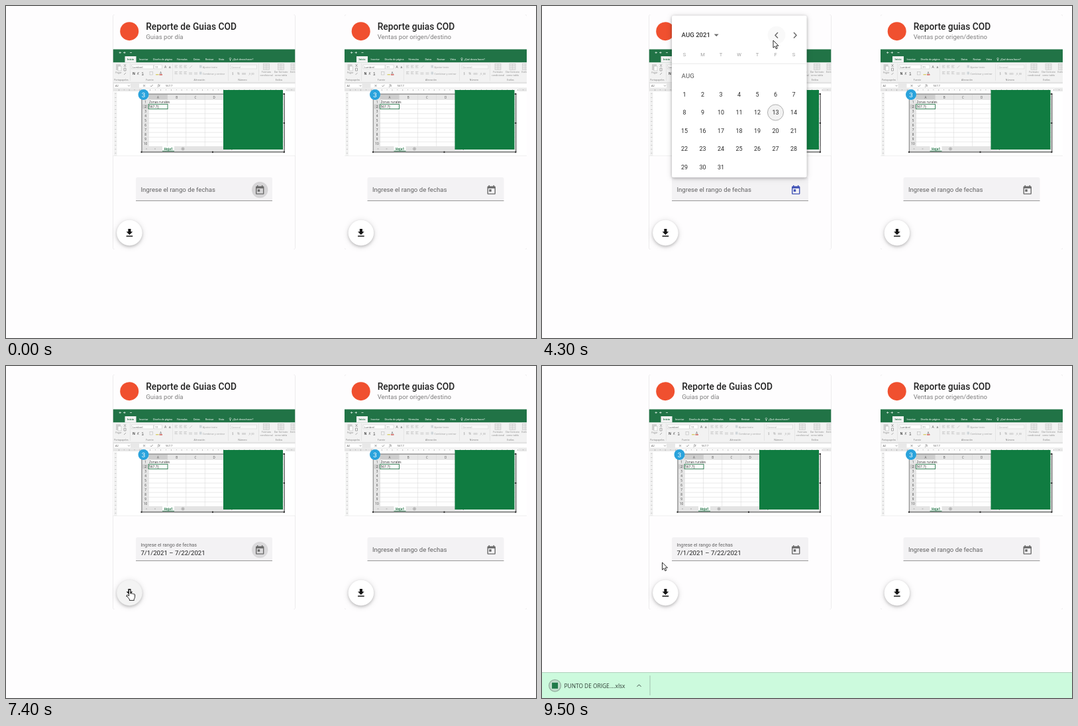
These frames come from a looping animation (800x502 px, 9.6 s). An HTML page:

```html
<!DOCTYPE html>
<html lang="es">
<head>
<meta charset="utf-8">
<title>Reporte de guias</title>
<style>
html, body { margin: 0; width: 100%; height: 100%; overflow: hidden; background: #fefdfe; }
svg { display: block; position: absolute; left: 0; top: 0; font-family: Roboto, Arial, sans-serif; }
.ui { font-family: "Open Sans", "Noto Sans", sans-serif; }
.card { filter: drop-shadow(0 .9px .5px rgba(0,0,0,.24)) drop-shadow(0 .4px .5px rgba(0,0,0,.06)); }
.fab { filter: drop-shadow(0 2px 2px rgba(0,0,0,.18)) drop-shadow(0 1px 4px rgba(0,0,0,.14)); }
.panel { filter: drop-shadow(0 1.5px 2px rgba(0,0,0,.26)) drop-shadow(0 1px 4px rgba(0,0,0,.14)); }
.mid { text-anchor: middle; }
</style>
</head>
<body>
<svg id="stage" width="800" height="502" viewBox="0 0 800 502"></svg>
<script>
const LOOP = 9600, STEP = 100, UNIT = 0.689, PITCH = 27.5, COL0 = 215, ROW0 = 133.5;
const INDIGO = '#3f51b5';
const TODAY_ICON = 'M19 3h-1V1h-2v2H8V1H6v2H5c-1.1 0-2 .9-2 2v14c0 1.1.9 2 2 2h14c1.1 0 2-.9 2-2V5c0-1.1-.9-2-2-2zm0 16H5V8h14v11zM7 10h5v5H7z';
const SAVE_ICON = 'M19 9h-4V3H9v6H5l7 7 7-7zM5 18v2h14v-2H5z';

const rect = (x, y, w, h, fill, more = '') => `<rect x="${x}" y="${y}" width="${w}" height="${h}" fill="${fill}" ${more}/>`;
const text = (x, y, size, str, fill = '#555', more = '') => `<text x="${x}" y="${y}" font-size="${size}" fill="${fill}" ${more}>${str}</text>`;
const circle = (x, y, r, fill, more = '') => `<circle cx="${x}" cy="${y}" r="${r}" fill="${fill}" ${more}/>`;
const line = (d, color, w = 0.6, more = '') => `<path d="${d}" fill="none" stroke="${color}" stroke-width="${w}" ${more}/>`;
const icon = (x, y, d, fill, more = '') => `<path d="${d}" fill="${fill}" transform="translate(${x} ${y}) scale(${UNIT}) translate(-12 -12)" ${more}/>`;
const times = (n, f) => Array.from({ length: n }, (_, i) => f(i)).join('');

// Spreadsheet picture shared by both cards
function ribbon() {
  const tabs = [[201, 'Insertar'], [222, 'Diseño de página'], [258, 'Fórmulas'], [283, 'Datos'], [301, 'Revisar'], [321, 'Vista'], [342, '¿Qué desea hacer?']];
  const groups = [[174, 'Portapapeles'], [217, 'Fuente'], [292, 'Alineación'], [357, 'Número'], [412, 'Estilos']];
  const labels = [[170, 102, 'Pegar'], [393, 101, 'Formato'], [393, 105.5, 'condicional'], [415, 101, 'Dar formato'], [415, 105.5, 'como tabla'], [434, 101, 'Estilos']];
  let s = rect(161.5, 65.5, 275, 20, '#217346');
  s += line('M174 70.5h-3l1.5-1.5m-1.5 1.5l1.5 1.5M177 70.5h3l-1.5-1.5m1.5 1.5l-1.5 1.5M187 70.5h3', '#dcebe2', 0.8);
  s += rect(179.5, 76, 17, 9.5, '#f3f3f3') + text(183, 82, 3.7, 'Inicio', '#217346', 'font-weight="700"');
  s += tabs.map(([x, n]) => text(x, 82, 3.5, n, '#eef6f1', 'font-weight="600"')).join('');
  s += circle(338.5, 79.7, 1.3, 'none', 'stroke="#fff" stroke-width=".5"') + rect(338, 81, 1, 1.7, '#fff');
  s += rect(161.5, 85.5, 275, 30.5, '#f2f2f2') + rect(161.5, 115.5, 275, 0.7, '#d0d0d0');
  s += [187, 251, 335, 381].map(x => rect(x, 87, 0.5, 26, '#d8d8d8')).join('');
  s += groups.map(([x, n]) => text(x, 112.5, 3.5, n, '#777', 'class="mid"')).join('');
  s += labels.map(([x, y, n]) => text(x, y, 3.6, n, '#888', 'class="mid"')).join('');
  s += rect(166, 88, 7, 9, '#d0d0d0') + rect(169, 91, 5, 7, '#fafafa', 'stroke="#b5b5b5" stroke-width=".5"');
  s += line('M178 88l3 4m0-4l-3 4M178 94h3v4h-3zM178 104l3-3', '#999', 0.8);
  s += rect(189.5, 89, 33, 6, '#fff', 'stroke="#c6c6c6" stroke-width=".5"') + text(191, 93.5, 4, 'Lumbrel');
  s += rect(223.5, 89, 12, 6, '#fff', 'stroke="#c6c6c6" stroke-width=".5"') + text(225, 93.5, 4, '11');
  s += text(239, 94, 5, 'A') + text(246, 94, 4.2, 'A');
  s += text(191, 103.5, 4.8, 'N', '#444', 'font-weight="700"') + text(198, 103.5, 4.8, 'K', '#444', 'font-style="italic"') + text(205, 103.5, 4.8, 'S', '#444', 'text-decoration="underline"');
  s += rect(217, 99.5, 4.5, 4.5, 'none', 'stroke="#bbb" stroke-width=".6"') + rect(226, 103, 4.5, 1.4, '#d8cf6a');
  s += text(232, 103, 4.8, 'A') + rect(231.5, 103.3, 4.5, 1.2, '#cc3b32');
  s += times(6, i => {
    const x = 254.5 + i % 3 * 7, y = i < 3 ? 90 : 99.5;
    return line(`M${x} ${y}h4.5m-4.5 1.6h3.2m-3.2 1.6h4.5`, '#b4b4b4');
  });
  s += line('M277 94l4-4M276 101h5m-5 2h5M284 101h5m-5 2h5', '#b4b4b4') + rect(292, 89.5, 3.5, 4, '#d0d6da') + rect(292, 99.5, 3.5, 4, '#d0d6da');
  s += text(297, 93.5, 3.7, 'Ajustar texto', '#999') + text(297, 103.5, 3.7, 'Combinar y centrar', '#999');
  s += rect(338.5, 89, 40, 6, '#f7f7f7', 'stroke="#cfcfcf" stroke-width=".5"') + text(340, 93.5, 3.8, 'General', '#aaa');
  s += text(341, 103.5, 4.4, '$', '#999') + text(349, 103.5, 4.4, '%', '#999') + text(356, 103.5, 3.6, '000', '#999') + text(366, 103.5, 3.4, ',0 ,00', '#999');
  s += [388.5, 410.5, 430].map(x => rect(x, 87.5, 9, 9, '#e8e8e8', 'stroke="#bbb" stroke-width=".5"') + line(`M${x} 90.5h9m-9 3h9M${x + 4.5} 87.5v9`, '#c4c4c4', 0.5)).join('');
  s += rect(161.5, 116, 275, 8.5, '#e8e8e8') + rect(163, 117.5, 25, 6, '#fff') + rect(201, 117.5, 236, 6, '#fff');
  s += text(165, 122.3, 4.1, 'A2') + text(241, 122.3, 4.1, '567.7');
  s += line('M184 119.8l1.5 1.5 1.5-1.5M207 119l3 3m0-3l-3 3M218 120.5l1.2 1.5 2.5-3', '#666') + text(229, 122.3, 4.5, 'fx', '#555', 'font-style="italic"');
  return s;
}

function sheet() {
  let s = rect(161.5, 124.5, 275, 102, '#fff') + rect(161.5, 124.5, 275, 4.5, '#e6e6e6') + rect(205, 125, 219, 4, '#f9f9f9');
  s += times(34, i => rect(170 + i * 7.9, 126, 0.6, i % 2 ? 1.4 : 2.2, '#999'));
  s += rect(163, 130, 4.5, 96.5, '#f1f1f1') + times(16, i => rect(164.3, 132 + i * 6, 2, 0.6, '#aaa'));
  s += rect(205, 133.2, 215, 87.3, '#fff', 'stroke="#989898" stroke-width="1.6"');
  s += rect(206, 134, 213.5, 7.5, '#e6e6e6') + rect(206, 141.5, 9, 70.5, '#e6e6e6');
  s += rect(215, 134, 29, 7.5, '#cecece') + rect(206, 148.5, 9, 7, '#cecece');
  s += times(8, i => rect(215 + i * 28.3, 134, 0.5, 78, '#d4d4d4')) + times(11, i => rect(206, 141.5 + i * 7.05, 213.5, 0.5, '#d4d4d4'));
  s += times(7, i => text(229.5 + i * 28.2, 139.7, 4.5, 'ABCDEFG'[i], '#555', 'class="mid"'));
  s += times(10, i => text(210.5, 146.9 + i * 7.05, 4.7, i + 1, '#444', 'class="mid"'));
  s += text(216, 146.9, 4.9, 'Zonas rurales', '#222') + rect(215.2, 148.6, 28.8, 7.1, '#fff', 'stroke="#217346" stroke-width=".9"') + text(216, 154, 4.9, '567.7', '#222') + rect(229.3, 150, 0.5, 5, '#222');
  s += rect(206, 212.2, 213.5, 7.8, '#e4e4e4') + rect(236, 212.2, 18, 7, '#fff') + rect(236, 218.8, 18, 0.9, '#217346');
  s += text(245, 217.6, 4.6, 'Hoja1', '#217346', 'class="mid" font-weight="700"');
  s += circle(267, 216, 2, 'none', 'stroke="#888" stroke-width=".6"') + line('M266 216h2m-1-1v2M211 216h2M224 216h2', '#888');
  s += rect(338, 213.5, 80, 5, '#f6f6f6') + text(339.5, 217.5, 3.8, '◂', '#777');
  s += line('M204 221H420.3V133', '#555', 0.7);
  s += [[203.5, 219.8], [311, 219.8], [418.8, 219.8], [418.8, 176], [418.8, 132]].map(([x, y]) => rect(x, y, 2, 2, '#222')).join('');
  return s + rect(328, 127, 90, 90, '#107c41');
}

const picture = `<g class="ui" clip-path="url(#pictureClip)">${ribbon()}${sheet()}</g>` + circle(207.5, 134, 8, '#2aa3dc') + text(207.5, 137.5, 9.8, '3', '#fff', 'class="mid"') + rect(161.5, 226.3, 275, 0.6, '#e8e8e8');

function card(dx, id, title, sub) {
  return `<g transform="translate(${dx})">` +
    rect(161.5, 13, 275, 355, '#fefdfe', 'rx="2.7" class="card"') +
    circle(186.2, 38.2, 14, '#f0502f') +
    text(211.2, 35.8, 13.78, title, 'rgba(0,0,0,.87)', 'font-weight="500"') +
    text(211.2, 50.2, 9.65, sub, 'rgba(0,0,0,.5)') + picture +
    rect(196, 259, 206, 36, '#f3f2f4', 'rx="2.5"') +
    rect(196, 294, 206, 0.9, '#8d8d8d', `id="${id}Line"`) +
    text(203.4, 280.8, 9.65, 'Ingrese el rango de fechas', 'rgba(0,0,0,.6)', `id="${id}Label"`) +
    text(203.4, 285.6, 9.65, '', 'rgba(0,0,0,.87)', `id="${id}Value"`) +
    circle(383.2, 278, 12.2, '#000', `id="${id}Halo" opacity="0"`) +
    icon(383.2, 278.6, TODAY_ICON, '#696969', `id="${id}Icon"`) +
    circle(186.4, 343, 19.2, '#fff', `class="fab" id="${id}Fab"`) +
    icon(186.4, 343.2, SAVE_ICON, '#161616') + '</g>';
}

const ARROW = 'M0 0V11.2L2.6 8.8 4.4 12.8 6.2 12 4.5 8.1H8z';
const HAND = 'M-1.2 .8Q0-.7 1.2 .8V6.2Q2.4 5 3.5 6.4 4.8 5.6 5.7 6.9 7.4 6.2 7.8 8V11.5Q7.6 13.3 6.5 14.4V16.4H-.4V14.8Q-2.6 12.2-4.4 9.6-4.6 7.6-2.9 8.1L-1.2 9.8Z';

const stage = document.getElementById('stage');
stage.innerHTML = '<clipPath id="pictureClip"><rect x="161.5" y="65" width="275" height="162"/></clipPath>' +
  '<clipPath id="nameClip"><rect id="nameBox" x="32" y="464" width="0" height="38"/></clipPath>' +
  card(0, 'a', 'Reporte de Guias COD', 'Guias por día') +
  card(349.5, 'b', 'Reporte guias COD', 'Ventas por origen/destino') +
  '<g id="panel"></g>' +
  '<g id="drop">' + `<path d="M-2.5-6.5h5v6H6L0 6-6-.5h3.5z" fill="#9bd3ee" stroke="#2795d0" stroke-width="1.2"/>` + line('M-2-3.5h4M-2-.5h4M-2 2.3h4', '#2580bd', 0.9) + '</g>' +
  line('M14.5 453H36', '#25a6b8', 2, 'stroke-dasharray="1.6 .6" id="dropLine"') +
  '<g id="shelf">' + rect(0, 463, 800, 39, '#ccfadd') + rect(0, 463, 800, 0.8, '#a8c6b4') +
  circle(19.5, 483.3, 9, '#bfdccb', 'id="ring" stroke="#222" stroke-width="1.2"') + rect(15, 478.8, 9, 9, '#21794a') +
  text(33.6, 486.7, 8.35, 'PUNTO DE ORIGE....xlsx', '#2c3a32', 'class="ui" clip-path="url(#nameClip)"') +
  '<g id="tail">' + line('M-19 1.8l3-3 3 3', '#3b4a41', 1) + line('M.5-15V15', '#9ebcab', 0.9) + '</g></g>' +
  '<path id="cursor" fill="#fff" stroke="#111" stroke-width=".9" stroke-linejoin="round"/>';

const el = id => document.getElementById(id);
const set = (id, attrs) => { for (const k in attrs) el(id).setAttribute(k, attrs[k]); };
const show = (id, on) => set(id, { visibility: on ? 'visible' : 'hidden' });

// Linear interpolation through [time, ...values] rows
function track(rows, t) {
  let i = 0;
  while (i < rows.length - 2 && t >= rows[i + 1][0]) i++;
  const a = rows[i], b = rows[i + 1];
  const k = Math.min(1, Math.max(0, (t - a[0]) / (b[0] - a[0])));
  return a.slice(1).map((v, j) => v + (b[j + 1] - v) * k);
}

const PATH = [
  [1400, 418, 264], [1600, 388.5, 274], [2300, 388.5, 274], [2500, 361, 234], [2900, 361, 230], [3500, 358, 170],
  [4100, 352, 82], [4300, 349, 52], [4500, 352, 44], [4900, 352, 44], [5400, 325, 106],
  [5600, 325, 106], [6000, 324.5, 188], [6300, 324.5, 188], [6600, 300, 220], [7200, 192, 316],
  [7300, 187, 338], [7700, 186, 338], [8000, 183, 307], [8600, 181, 299], [9200, 181.5, 297]
];
const PANEL_FADE = [[2000, 0], [2200, 0.65], [2300, 1], [6200, 1], [6300, 0.17], [6400, 0]];
const SEPARATOR = [[7800, 24], [8000, 50], [8400, 162.5]];

function cellAt(x, y, july) {
  const col = Math.round((x - COL0) / PITCH), row = Math.round((y - ROW0) / PITCH);
  const day = july ? row * 7 + col + 4 : row * 7 + col + 1;
  return col >= 0 && col < 7 && row >= (july ? -1 : 0) && day > 0 && day < 32 ? day : 0;
}

function cellPos(day, july) {
  const n = july ? day + 3 : day - 1;
  return [COL0 + n % 7 * PITCH, ROW0 + (Math.floor(n / 7) - (july ? 1 : 0)) * PITCH];
}

// One bar per week between two days
function span(from, to, style) {
  let s = '';
  for (let d = from; d <= to;) {
    const [x, y] = cellPos(d, true);
    const end = Math.min(to, d + 6 - (d + 3) % 7);
    s += rect(x - 12, y - 12, (end - d) * PITCH + 24, 24, ...style);
    d = end + 1;
  }
  return s;
}

function drawPanel(t, day, july) {
  const start = t >= 5600, end = t >= 6300;
  let s = rect(196, 14.5, 203.6, 244.7, '#fff', 'rx="2.7" class="panel"');
  if (t >= 4300 && t < 5100) s += circle(354, 44, 13.5, `rgba(0,0,0,${t < 4400 ? 0.025 : 0.05})`);
  s += text(210.6, 47.2, 9.65, july ? 'JUL 2021' : 'AUG 2021', 'rgba(0,0,0,.8)', 'font-weight="500"');
  s += `<path d="M${july ? 255 : 259.7} 42.4h7l-3.5 3.5z" fill="#6c6c6c"/>`;
  s += line('M356 40l-4 4.2 4 4.2M380 40l4 4.2-4 4.2', '#666', 1.4);
  s += times(7, i => text(COL0 + i * PITCH, 76, 7.5, 'SMTWTFS'[i], 'rgba(0,0,0,.38)', 'class="mid"'));
  s += rect(196, 86.8, 203.6, 0.7, '#dedede');
  s += text(210.6, 109, 9.65, july ? 'JUL' : 'AUG', 'rgba(0,0,0,.54)', 'font-weight="500"');
  if (end) s += span(1, 22, ['rgba(63,81,181,.2)', 'rx="12"']);
  else if (start && day > 1) s += span(1, day, ['none', 'rx="12" stroke="#ccc" stroke-width=".7" stroke-dasharray="2 2"']);
  for (let d = 1; d < 32; d++) {
    const [cx, cy] = cellPos(d, july);
    const picked = july && (start && d === 1 || end && d === 22);
    if (picked) s += circle(cx, cy, 12, INDIGO);
    else if (d === day) s += circle(cx, cy, 12, july ? 'rgba(63,81,181,.3)' : 'rgba(0,0,0,.05)');
    if (!july && d === 13) s += circle(cx, cy, 12, '#f2f2f2', 'stroke="#9c9c9c" stroke-width=".8"');
    s += text(cx, cy + 3.2, 8.96, d, picked ? '#fff' : 'rgba(0,0,0,.84)', 'class="mid"');
  }
  el('panel').innerHTML = s;
}

function drawField(t) {
  const open = t >= 2200 && t < 6300, hover = t >= 1500 && t < 2200, filled = t >= 5600;
  set('aLine', { y: hover ? 293.4 : 294, height: hover ? 1.5 : 0.9, fill: hover ? '#222' : '#8d8d8d' });
  set('aLabel', { y: filled ? 273 : 280.8, 'font-size': filled ? 7.24 : 9.65 });
  el('aValue').textContent = t >= 6300 ? '7/1/2021 – 7/22/2021' : filled ? '7/1/2021 –' : '';
  const halo = t < 2400 ? 0.12 : t < 2700 ? 0.04 : t >= 6300 && t < 7500 ? 0.1 : 0;
  set('aHalo', { opacity: halo });
  set('aIcon', { fill: open ? INDIGO : '#696969' });
  set('aFab', { fill: t < 7300 || t >= 8600 ? '#fff' : t < 7500 ? '#f3f3f3' : '#e5e5e5' });
}

function drawShelf(t) {
  show('shelf', t >= 7700);
  set('shelf', { transform: `translate(0 ${t < 7800 ? 20 : 0})` });
  const [sep] = track(SEPARATOR, t);
  set('tail', { transform: `translate(${sep} 483)` });
  set('nameBox', { width: Math.max(0, sep - 50) });
  const pulse = t < 8400 ? 1 : 0.55 + 0.25 * Math.cos((t - 8400) / 1100 * Math.PI * 3);
  set('ring', { 'stroke-opacity': pulse });
  const falling = t >= 7800 && t < 8400;
  show('drop', falling);
  show('dropLine', falling);
  const [y, alpha] = track([[7800, 424, 0.6], [8000, 435, 1], [8200, 444, 0.8], [8400, 448, 0]], t);
  set('drop', { transform: `translate(25 ${y})`, opacity: alpha });
  set('dropLine', { opacity: alpha });
}

function draw(t) {
  const [x, y] = track(PATH, t), july = t >= 4700;
  const [fade] = track(PANEL_FADE, t);
  const day = fade > 0 ? cellAt(x, y, july) : 0;
  show('panel', fade > 0);
  if (fade > 0) {
    drawPanel(t, day, july);
    const squash = t < 2300 ? 0.8 + 0.2 * fade : 1;
    set('panel', { opacity: fade, transform: `translate(0 ${259 * (1 - squash)}) scale(1 ${squash})` });
  }
  drawField(t);
  drawShelf(t);
  const hand = t >= 1600 && t < 2400 || t >= 4400 && t < 5100 || t >= 7300 && t < 7800 || day > 0;
  show('cursor', t >= 1400);
  set('cursor', { d: hand ? HAND : ARROW, transform: `translate(${x} ${y})` });
}

const begin = performance.now();
let last = -1;
function frame() {
  const t = Math.floor((performance.now() - begin) % LOOP / STEP) * STEP;
  if (t !== last) draw(last = t);
  requestAnimationFrame(frame);
}
frame();
</script>
</body>
</html>
```
